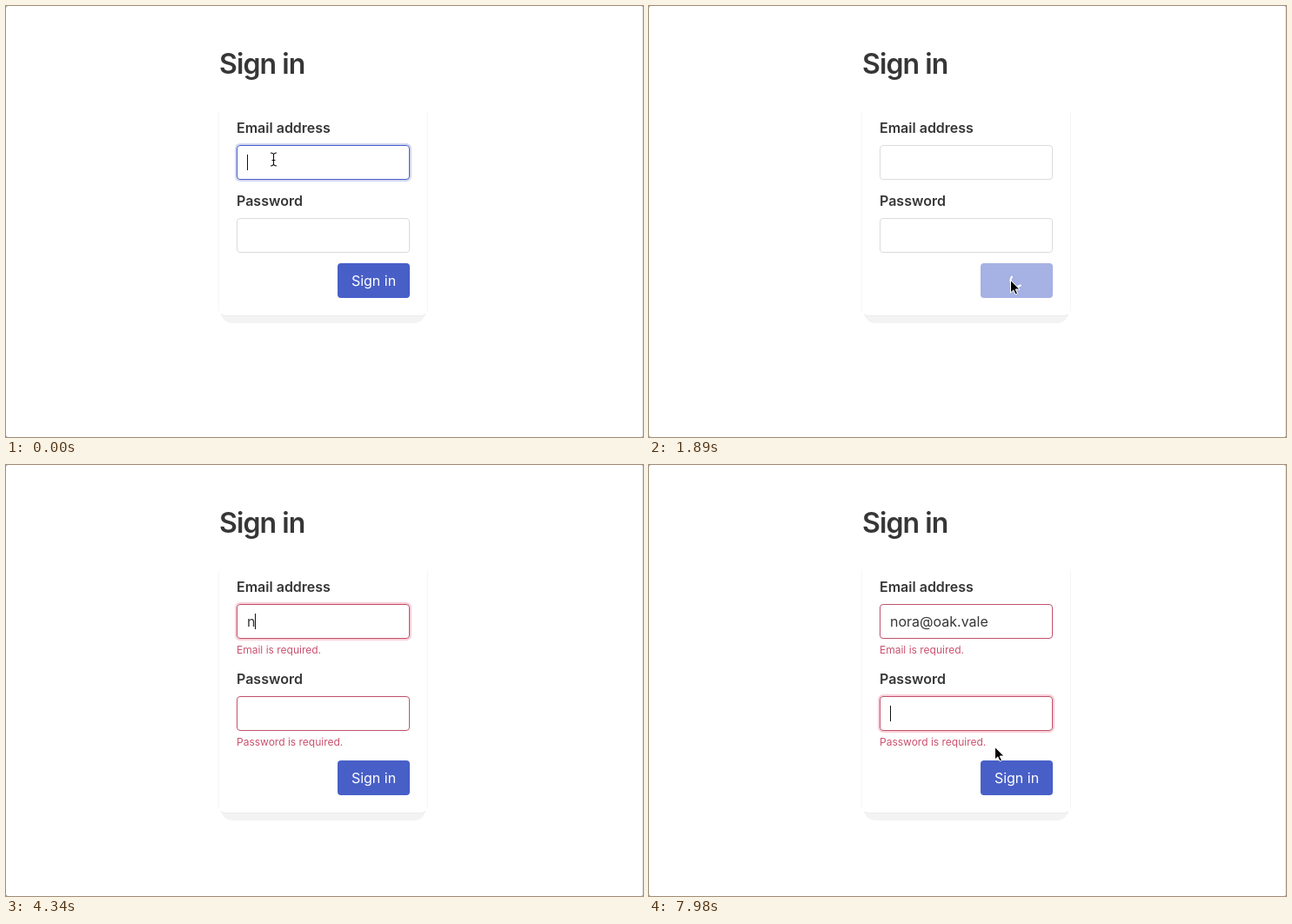
An HTML page for the animation above (8 s loop, 732x496 px).

```html
<!DOCTYPE html>
<html lang="en">
<head>
<meta charset="utf-8">
<title>Sign in form</title>
<style>
  html, body { margin: 0; width: 100%; height: 100%; overflow: hidden; background: #777; }
  svg { display: block; width: 732px; height: 496px; font: 16px Inter, "Open Sans", sans-serif; fill: #363636; }
  .title { font-size: 32px; font-weight: 600; letter-spacing: -.9px; }
  .label { font-weight: 600; }
  .help { font-size: 12px; fill: #cc506e; }
  .box { fill: #fff; stroke: #dbdbdb; }
  .ring { fill: none; stroke: #d1d7f1; stroke-width: 2; visibility: hidden; }
  .hover .box { stroke: #b5b5b5; }
  .focus .box { stroke: #485fc7; }
  .focus .ring { visibility: visible; }
  .invalid .box { stroke: #c0506a; }
  .invalid .ring { stroke: #f8cfd8; }
  .caret { fill: #111; }
</style>
</head>
<body>
<svg viewBox="0 0 732 496">
  <rect width="732" height="496" rx="2" fill="#fff"/>
  <path d="M731.5 2V494" stroke="#e4e4e4"/>
  <text class="title" x="245" y="78">Sign in</text>

  <g id="base">
    <rect x="247" y="320" width="235" height="45" rx="13" fill="#f3f3f3"/>
    <rect x="245" y="310" width="239" height="46" rx="6" fill="#fff"/>
    <path d="M247 354.500Q249 356.500 252 356.500H477Q480 356.500 482 354.500" fill="none" stroke="#ececec"/>
  </g>
  <path id="sides" fill="none" stroke="#f6f6f6"/>

  <g id="email">
    <text class="label" x="265" y="146">Email address</text>
    <rect class="ring" x="264" y="159" width="201" height="42" rx="5"/>
    <rect class="box" x="265.5" y="160.5" width="198" height="39" rx="3.5"/>
    <text id="typed" x="277" y="186"></text>
    <rect class="caret" x="277" y="171" width="1" height="18"/>
    <text class="help" x="265" y="217">Email is required.</text>
  </g>
  <g id="password">
    <text class="label" x="265" y="230">Password</text>
    <rect class="ring" x="264" y="243" width="201" height="42" rx="5"/>
    <rect class="box" x="265.5" y="244.5" width="198" height="39" rx="3.5"/>
    <rect class="caret" x="277" y="255" width="1" height="18"/>
    <text class="help" x="265" y="301">Password is required.</text>
  </g>
  <g id="button">
    <rect id="face" x="381" y="296" width="83" height="40" rx="4"/>
    <text id="caption" x="422.5" y="322" text-anchor="middle" fill="#fff">Sign in</text>
    <path id="spinner" d="M427.5 321A7 7 0 0 1 417.500 311" fill="none" stroke="#fff" stroke-width="2"/>
  </g>

  <g id="pointer">
    <path id="arrow" d="M0 0V14.500L3.300 11.400L5.600 16.500L8 15.400L5.700 10.500H10.400Z" fill="#000" stroke="#fff"/>
    <g id="beam" fill="none">
      <path id="beamShape" d="M-3.500-7.500Q0-7.500 0-5V5Q0 7.500-3.500 7.500M3.500-7.500Q0-7.500 0-5M0 5Q0 7.500 3.500 7.500M-2 1H2" stroke="#fff" stroke-width="2.400"/>
      <use href="#beamShape"/>
      <path d="M-3.500-7.500Q0-7.500 0-5V5Q0 7.500-3.500 7.500M3.500-7.500Q0-7.500 0-5M0 5Q0 7.500 3.500 7.500M-2 1H2" stroke="#111" stroke-width="1.100"/>
    </g>
  </g>
</svg>
<script>
const LOOP = 8000, STEP = 70;
const ADDRESS = 'nora@oak.vale';
const KEYS = [4200, 4550, 4620, 4830, 5110, 5460, 5600, 5670, 5880, 6020, 6160, 6300, 6370];
// Pointer stops: time, x, y
const PATH = [
  [0, 307, 176], [140, 316, 180], [490, 316, 180], [630, 350, 252], [700, 350, 252],
  [1050, 367, 266], [1190, 372, 271], [1470, 412, 313], [1540, 415, 315], [3010, 415, 315],
  [3220, 398, 275], [3430, 353, 190], [3570, 343, 172], [7560, 343, 172], [7980, 397, 324]
];

const $ = id => document.getElementById(id);
const within = (t, a, b) => t >= a && t < b;
const show = (el, on) => el.setAttribute('visibility', on ? 'visible' : 'hidden');
const shift = (el, y) => el.setAttribute('transform', `translate(0 ${y})`);

function pointerAt(t) {
  const i = Math.max(1, PATH.findIndex(p => p[0] >= t));
  const [t0, x0, y0] = PATH[i - 1], [t1, x1, y1] = PATH[i];
  const k = (t - t0) / (t1 - t0);
  return [x0 + (x1 - x0) * k, y0 + (y1 - y0) * k];
}

function drawField(el, state, hasCaret) {
  el.setAttribute('class', Object.keys(state).filter(k => state[k]).join(' '));
  show(el.querySelector('.caret'), hasCaret);
  show(el.querySelector('.help'), state.invalid);
}

function draw(t) {
  const invalid = t >= 2450, loading = within(t, 1610, 2450);
  const [x, y] = pointerAt(t);
  const drop = invalid ? 22 : 0;
  const overX = x >= 265 && x <= 464;
  const overEmail = overX && within(y, 160, 200);
  const overPassword = overX && within(y, 244 + drop, 284 + drop);

  shift($('password'), drop);
  shift($('button'), 2 * drop);
  shift($('base'), 2 * drop);
  $('sides').setAttribute('d', `M244.5 121V${351 + 2 * drop}M484.500 121V${351 + 2 * drop}`);

  const typed = $('typed');
  typed.textContent = ADDRESS.slice(0, KEYS.filter(k => k <= t).length);
  $('email').querySelector('.caret').setAttribute('x', 277 + Math.round(typed.getComputedTextLength()));
  drawField($('email'),
    { invalid, hover: overEmail, focus: t < 1610 || within(t, 3640, 6510) },
    t < 420 || within(t, 910, 1400) || within(t, 3640, 6510));
  drawField($('password'),
    { invalid, hover: overPassword, focus: t >= 6510 },
    within(t, 6510, 6930) || t >= 7560);

  $('face').setAttribute('fill', loading ? '#a6b1e4' : '#485fc7');
  show($('caption'), !loading);
  show($('spinner'), loading);
  $('spinner').setAttribute('transform', `rotate(${(t - 1890) * .72} 422.5 316)`);

  const visible = !within(t, 3780, 7560), beam = overEmail || overPassword;
  $('pointer').setAttribute('transform', `translate(${Math.round(x) + .5} ${Math.round(y) + .5})`);
  show($('beam'), visible && beam);
  show($('arrow'), visible && !beam);
}

const start = performance.now();
function tick() {
  const t = (performance.now() - start) % LOOP;
  draw(Math.floor(t / STEP) * STEP);
  requestAnimationFrame(tick);
}
tick();
</script>
</body>
</html>
```
